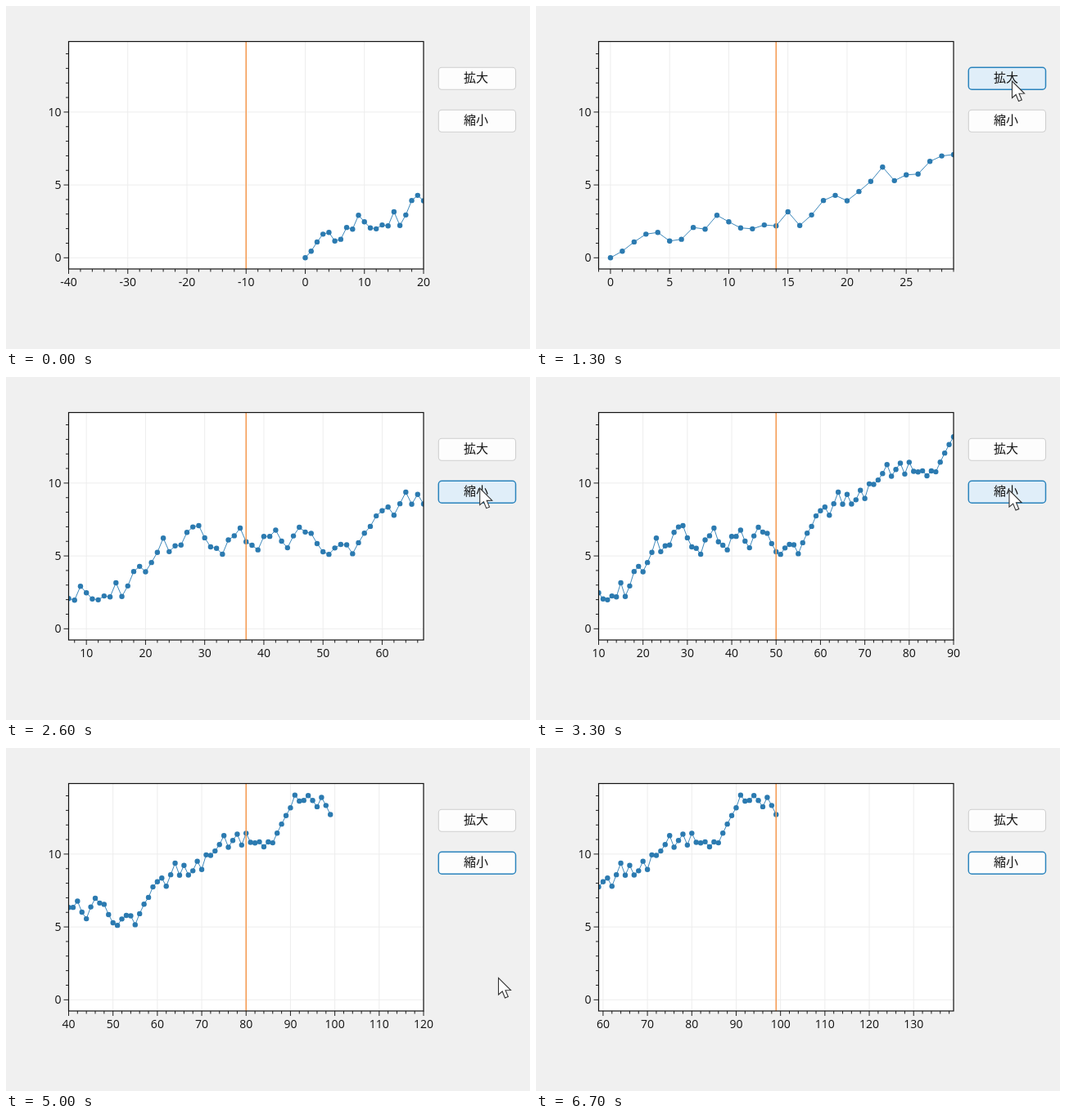
Recreate the animation shown at these times as an HTML page with a canvas. Size 640 by 420 pixels, loop 7100 ms.

```html
<!DOCTYPE html>
<html lang="ja">
<head>
<meta charset="utf-8">
<style>
html, body { margin: 0; width: 100%; height: 100%; overflow: hidden; background: #f0f0f0; }
canvas { display: block; }
</style>
</head>
<body>
<canvas id="stage" width="640" height="420"></canvas>
<script>
const ctx = document.getElementById('stage').getContext('2d');
const LOOP = 7100, STEP = 100, LAST = 6700;
const plot = { left: 76.5, right: 510, top: 43.5, bottom: 322 };
const middle = (plot.left + plot.right) / 2;
const zeroY = 308.3, unitY = 17.84;
const clamp = (value, min, max) => Math.min(max, Math.max(min, value));

// Knuth's subtractive random generator with seed 0.
function createRandom() {
  const MAX = 2147483647, state = [];
  const wrap = value => value < 0 ? value + MAX : value;
  let previous = 161803398, current = 1;
  state[55] = previous;
  for (let i = 1; i < 55; i++) {
    const slot = 21 * i % 55;
    state[slot] = current;
    current = wrap(previous - current);
    previous = state[slot];
  }
  for (let round = 0; round < 4; round++) {
    for (let i = 1; i <= 55; i++) state[i] = wrap(state[i] - state[1 + (i + 30) % 55]);
  }
  let a = 0, b = 21;
  return () => {
    a = a % 55 + 1;
    b = b % 55 + 1;
    state[a] = wrap(state[a] - state[b]);
    return state[a] / MAX;
  };
}

const random = createRandom();
const samples = [0];
while (samples.length < 100) samples.push(samples.at(-1) + random() * 2 - 1);

// Number of evenly spaced clicks made by time t.
const clicks = (t, first, interval, count) =>
  clamp(Math.floor((t - first) / interval) + 1, 0, count);

const buttons = [
  { label: '拡大', y: 75.3, clicked: t => clicks(t, 1000, 150, 5) },
  { label: '縮小', y: 127.3, clicked: t => clicks(t, 1990, 140, 7) }
];

const path = [
  { t: 900, x: 582, y: 91 },
  { t: 1700, x: 580, y: 92 },
  { t: 1840, x: 579, y: 133 },
  { t: 4700, x: 576, y: 143 },
  { t: 5000, x: 601, y: 281 },
  { t: 5200, x: 603, y: 284 }
];

function pointerAt(t) {
  const next = path.findIndex(key => key.t > t);
  if (next < 1) return null;
  const from = path[next - 1], to = path[next];
  const k = (t - from.t) / (to.t - from.t);
  return { x: from.x + (to.x - from.x) * k, y: from.y + (to.y - from.y) * k };
}

function line(x1, y1, x2, y2, color, width = 1) {
  ctx.strokeStyle = color;
  ctx.lineWidth = width;
  ctx.beginPath();
  ctx.moveTo(x1, y1);
  ctx.lineTo(x2, y2);
  ctx.stroke();
}

function text(label, x, y, align) {
  ctx.fillStyle = '#111';
  ctx.textAlign = align;
  ctx.fillText(label, x, y);
}

function drawChart(center, span) {
  const scale = (plot.right - plot.left) / span;
  const toX = value => middle + (value - center) * scale;
  const toY = value => zeroY - value * unitY;
  const low = center - span / 2, high = center + span / 2;
  const major = [1, 2.5, 5, 10].find(step => step * scale >= 50);
  const minor = major / 5;
  const width = plot.right - plot.left, height = plot.bottom - plot.top;

  ctx.fillStyle = '#fff';
  ctx.fillRect(plot.left, plot.top, width, height);
  ctx.font = '14px "Open Sans", "Noto Sans", sans-serif';

  for (let i = Math.ceil(low / minor - 1e-6); i <= high / minor + 1e-6; i++) {
    const x = toX(i * minor), isMajor = i % 5 === 0;
    if (isMajor) {
      line(x, plot.top, x, plot.bottom, '#ededed');
      text(String(i * minor), x, 343.4, 'center');
    }
    line(x, plot.bottom, x, plot.bottom + (isMajor ? 6 : 3.5), '#222');
  }
  for (let value = 0; value <= 14; value++) {
    const y = toY(value), isMajor = value % 5 === 0;
    if (isMajor) {
      line(plot.left, y, plot.right, y, '#ededed');
      text(String(value), 67.5, y + 5, 'right');
    }
    line(plot.left - (isMajor ? 6 : 3.5), y, plot.left, y, '#222');
  }

  ctx.save();
  ctx.beginPath();
  ctx.rect(plot.left, plot.top, width, height);
  ctx.clip();
  ctx.strokeStyle = '#3d88bb';
  ctx.fillStyle = '#2b7ab0';
  ctx.lineWidth = 1;
  ctx.beginPath();
  samples.forEach((value, i) => ctx.lineTo(toX(i), toY(value)));
  ctx.stroke();
  samples.forEach((value, i) => {
    ctx.beginPath();
    ctx.arc(toX(i), toY(value), 3.2, 0, Math.PI * 2);
    ctx.fill();
  });
  line(middle, plot.top, middle, plot.bottom, '#f59a50', 1.5);
  ctx.restore();

  ctx.strokeStyle = '#111';
  ctx.lineWidth = 1.2;
  ctx.strokeRect(plot.left, plot.top, width, height);
}

function drawButton({ label, y }, focused, hovered) {
  const active = focused || hovered;
  ctx.beginPath();
  ctx.roundRect(528.3, y, 94.2, 26.9, 4);
  ctx.fillStyle = hovered ? '#e0eef9' : '#fdfdfd';
  ctx.fill();
  ctx.strokeStyle = active ? '#2b84bd' : '#cfcfcf';
  ctx.lineWidth = active ? 1.5 : 1.1;
  ctx.stroke();
  ctx.font = '15px "Noto Sans CJK JP", "Noto Sans CJK", sans-serif';
  text(label, 574, y + 18, 'center');
}

function drawPointer({ x, y }) {
  const outline = [[0, 0], [0, 20.5], [4.7, 16.5], [8, 24.5], [11.8, 23], [8.5, 15.2], [15, 15]];
  ctx.beginPath();
  outline.forEach(([dx, dy]) => ctx.lineTo(x + dx + 0.5, y + dy + 0.5));
  ctx.closePath();
  ctx.fillStyle = '#fff';
  ctx.fill();
  ctx.strokeStyle = '#333';
  ctx.lineWidth = 1.1;
  ctx.stroke();
}

function draw(time) {
  const t = Math.min(LAST, Math.floor((time % LOOP) / STEP) * STEP);
  const [zoomIn, zoomOut] = buttons.map(button => button.clicked(t));
  const center = Math.min(99, Math.round(-10 + t * 0.01809));
  const pointer = pointerAt(t);
  const focus = buttons.findLast(button => button.clicked(t));

  ctx.fillStyle = '#f0f0f0';
  ctx.fillRect(0, 0, 640, 420);
  drawChart(center, 60 + 10 * (zoomOut - zoomIn));
  for (const button of buttons) {
    const hovered = pointer && pointer.y >= button.y && pointer.y <= button.y + 27;
    drawButton(button, button === focus, hovered);
  }
  if (pointer) drawPointer(pointer);
}

const start = performance.now();
function tick() {
  draw(performance.now() - start);
  requestAnimationFrame(tick);
}
tick();
</script>
</body>
</html>
```
